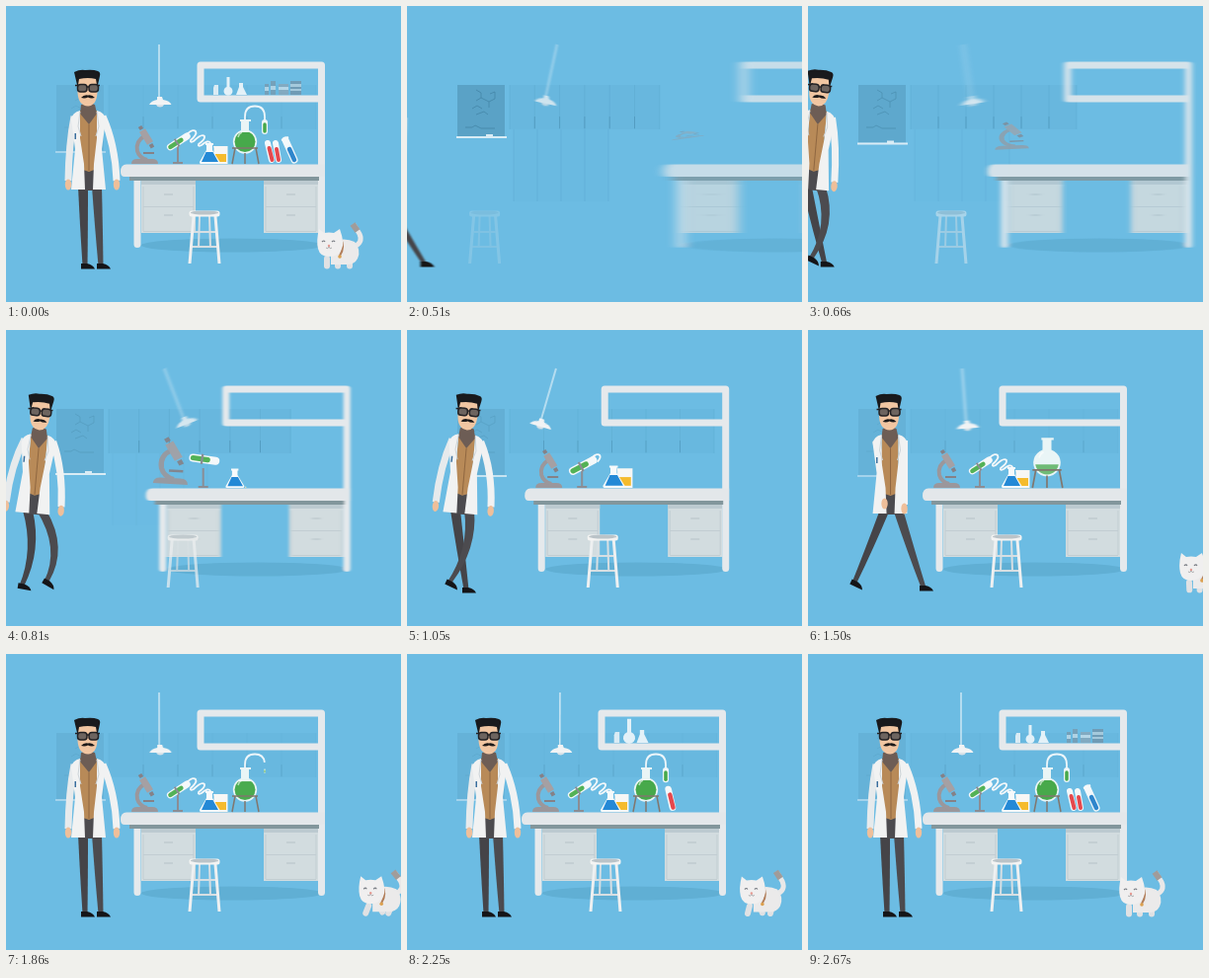
Write an HTML page that moves like this. It is 400 px wide and 300 px high and loops after 2.88 s.

```html
<!DOCTYPE html>
<html lang="en">
<head>
<meta charset="utf-8">
<title>Laboratory</title>
<style>
html, body { margin: 0; width: 100%; height: 100%; overflow: hidden; background: #6cbce3; }
svg { display: block; width: 100%; height: 100%; }
.line { fill: none; stroke-linejoin: round; }
.round { stroke-linecap: round; }
</style>
</head>
<body>
<svg viewBox="0 0 400 300">
<defs>
  <filter id="deskBlur" filterUnits="userSpaceOnUse" x="-500" y="0" width="1400" height="300"><feGaussianBlur stdDeviation="0 0"/></filter>
  <filter id="manBlur" filterUnits="userSpaceOnUse" x="-100" y="0" width="400" height="300"><feGaussianBlur stdDeviation="0 0"/></filter>
  <filter id="lampBlur" filterUnits="userSpaceOnUse" x="0" y="0" width="400" height="200"><feGaussianBlur stdDeviation="0 0"/></filter>
  <clipPath id="bulb"><circle cx="242" cy="137.500" r="10.500"/></clipPath>
  <g id="drawers">
    <path fill="#d2dcdf" d="M0 176h55v54H0z"/>
    <path fill="#bccad0" d="M0 176h55v5H0z"/>
    <path class="line" stroke="#c1cdd2" d="M2 203.500h51M2 228.500h51M2 183v45M53 183v45"/>
    <path class="line" stroke="#b5c2c8" stroke-width="1.200" d="M23 191h9M23 212h9"/>
  </g>
</defs>
<rect width="400" height="300" fill="#6cbce3"/>
<g id="scene">
  <g id="cabinets"></g>
  <g id="board">
    <rect id="slate" x="51" y="80" width="48" fill="#5399bb" opacity=".75"/>
    <path class="line" stroke="#3f7f9f" stroke-width=".7" d="M70 85l5 3v5l-5 3M75 93l8 4 6-3v-7l-5 2M66 104l5-3 5 3M83 97v6M59 123h7l3-2 6 3h14M70 110l8-3 4 3"/>
  </g>
  <path id="tray" fill="#d9ecf5" d="M50 0h51v2H50zM80-2h7v2h-7z"/>

  <g id="lamp">
    <path class="line" stroke="#dceef7" stroke-width="1.300" d="M155 39V93"/>
    <path fill="#f1f3f4" d="M153 92h5l1 3q7 1 8.500 5H145q2-4 8-5z"/>
    <path fill="#d8e2e8" d="M152 100h8q-1 2.500-4 2.500t-4-2.500z"/>
  </g>

  <g id="desk">
    <ellipse cx="229" cy="242.500" rx="92" ry="7" fill="#60afd4"/>
    <use href="#drawers" x="137"/>
    <use href="#drawers" x="261"/>
    <path class="line round" stroke="#e5e9ec" stroke-width="7" d="M133 175V241.500M319.500 241.500V60H197V94H319"/>
    <path fill="#82969c" d="M125 172H317v5H125z"/>
    <path fill="#e3e7ea" d="M122 160.500H323v12.500H120q-4 0-4-5 0-7.500 6-7.500z"/>
  </g>

  <g id="gear">
    <g id="shelf">
      <g class="pop" data-at="1950" data-x="213" data-y="90"><path fill="#d9ebf4" d="M211 80h4v10h-5v-7z"/></g>
      <g class="pop" data-at="1980" data-x="225" data-y="90" data-over="1.350"><path fill="#e3f1f8" d="M223.500 72h3v10a4.500 4.500 0 1 1-3 0z"/></g>
      <g class="pop" data-at="2000" data-x="238" data-y="90"><path fill="#e3f1f8" d="M236 78h4v4l4 8h-11l3-8z"/></g>
      <g opacity=".75">
        <g class="pop" data-at="2280" data-x="268" data-y="90" data-pace=".8"><path fill="#7898ad" d="M262 79h4v11h-4zM268 76h5v14h-5z"/><path fill="#c7dbe6" d="M262 82h4v4h-4zM268 81h5v4h-5z"/></g>
        <g class="pop" data-at="2300" data-x="281" data-y="90" data-pace=".8"><path fill="#8ba6b7" d="M276 79h10v11h-10z"/><path fill="#cfe0ea" d="M276 82h10v3h-10z"/></g>
        <g class="pop" data-at="2310" data-x="294" data-y="90" data-pace=".8"><path fill="#7292a7" d="M288 76h11v14h-11z"/><path fill="#b8cfdc" d="M288 79h11v3h-11zM288 84h11v2h-11z"/></g>
      </g>
    </g>

    <g id="scope">
      <path fill="#9b979b" d="M127 160q0-5 6-5h15q6 0 6 5z"/>
      <path class="line" stroke="#9b979b" stroke-width="4" d="M140 132q-9 5-7 15 2 7 10 9"/>
      <path class="line" stroke="#858187" stroke-width="2" d="M139 149h11"/>
      <path class="line" stroke="#a5a0a3" stroke-width="7" d="M138 126l8 13"/>
      <path class="line" stroke="#858187" stroke-width="4" d="M135.500 122l2 3M146.500 140l2 3.500"/>
    </g>

    <g id="stand">
      <path class="line" stroke="#8b8d94" stroke-width="2" d="M174 140V159M169 159h10"/>
      <g id="tube">
        <path class="line round" stroke="#f4f8fa" stroke-width="7" d="M-9 0H11"/>
        <path class="line round" stroke="#53b256" stroke-width="4.500" d="M-9 0H4"/>
        <path class="line" stroke="#8b8d94" stroke-width="2" d="M-1-4.500V4.500"/>
      </g>
    </g>
    <path id="coil" class="line" stroke="#f4f8fa" stroke-width="1.800" pathLength="1" stroke-dasharray="1 2" d="M182 131q7-7 10-4 2 3-5 9-1 3 3 1 8-8 11-5 1 3-6 8-1 3 3 1 7-6 9-2 1 3-1 5"/>

    <g class="pop" data-at="800" data-x="217" data-y="160">
      <path fill="#f7f7f5" d="M210 142h14.500v18h-14v-16z"/><path fill="#f5bb2d" d="M212 150h11v8h-11z"/>
    </g>
    <g class="pop" data-at="660" data-x="206" data-y="160" data-over="1.220">
      <path fill="#f7fafb" d="M202 139h8v2h-1v5l7.500 12q0 2-2 2h-17q-2 0-1.500-2l7-12v-5h-1z"/>
      <path fill="#2489d6" d="M202.500 148h7l5.500 10h-17z"/>
    </g>

    <g class="pop" data-at="1230" data-x="242" data-y="160">
      <path fill="#e9f5f6" d="M237 115h11v2h-2v9a12.200 12.200 0 1 1-8 0v-9h-1z"/>
      <g clip-path="url(#bulb)"><rect id="liquid" x="228" width="28" height="40" fill="#47a94b"/></g>
      <path class="line" stroke="#fff" stroke-width="1.500" opacity=".6" d="M235 133q1-4 4-5"/>
      <path class="line" stroke="#81776f" stroke-width="1.500" d="M229 144h26M232 144l-3 16M253 144l3 16M242 149v11"/>
    </g>
    <path id="pipe" class="line" stroke="#edf6fa" stroke-width="1.800" pathLength="1" stroke-dasharray="1 2" d="M242 117V112Q242 101.500 252 101.500T262 112V118"/>
    <g class="pop" data-at="1820" data-x="262" data-y="117">
      <path class="line round" stroke="#f0f7f9" stroke-width="6" d="M262 118v9"/>
      <path class="line round" stroke="#47a94b" stroke-width="3.500" d="M262 120v7"/>
    </g>
    <g class="pop" data-at="2000" data-x="269" data-y="160">
      <path class="line round" stroke="#f4f8fa" stroke-width="6" d="M265 139l4 17"/><path class="line round" stroke="#e5484d" stroke-width="4" d="M266.500 144l3 12"/>
    </g>
    <g class="pop" data-at="2260" data-x="275" data-y="160" data-pace=".85">
      <path class="line round" stroke="#f4f8fa" stroke-width="6" d="M273 139l3 17"/><path class="line round" stroke="#e5484d" stroke-width="4" d="M274 145l2 11"/>
    </g>
    <g class="pop" data-at="2290" data-x="291" data-y="160" data-pace=".8">
      <path class="line round" stroke="#f4f8fa" stroke-width="7" d="M283 136l9 20"/><path class="line round" stroke="#2f86cc" stroke-width="4.500" d="M287 145l5 11"/>
      <path class="line" stroke="#f4f8fa" stroke-width="2" d="M279 136l7-3"/>
    </g>
  </g>

  <g id="stool">
    <path class="line" stroke="#d7dfe3" stroke-width="2" d="M196 213l-1 32M206 213l1 32M190 229h22M188 244h26"/>
    <path class="line" stroke="#eef0f1" stroke-width="3" d="M190 213l-4 48M212 213l4 48"/>
    <rect x="185.500" y="207.500" width="31" height="6" rx="2.500" fill="#f4f4f3"/>
    <ellipse cx="201" cy="209.500" rx="14" ry="2" fill="#bac3c8"/>
  </g>

  <g id="man">
    <path id="legA" fill="#454448"/>
    <path id="legB" fill="#4c4b4f"/>
    <path id="shoeA" fill="#151518" d="M-4-3h6q6 1 8 5.500H-4z"/>
    <path id="shoeB" fill="#151518" d="M-4-3h6q6 1 8 5.500H-4z"/>
    <g id="body">
      <path id="armL" class="line" stroke="#e6eaec" stroke-width="7"/>
      <path fill="#4c4b4f" d="M75 164h18v23H75z"/>
      <path fill="#b88a58" d="M75 106h17v59l-8 3-9-3z"/>
      <path class="line" stroke="#8f6740" d="M84 120v47"/>
      <path fill="#6d5d55" d="M76 100q8-3 14 0l2 9-8 11-9-11z"/>
      <path fill="#f1f2f2" d="M75 106q-8 2-9 9l4 30-4 41h14l-1-26-4-26z"/>
      <path fill="#f1f2f2" d="M92 106q8 2 9 9l-4 30 4 41H88l1-26 3-26z"/>
      <path class="line" stroke="#cdd5da" d="M75 107l-2 15 3 10M92 107l2 15-3 10"/>
      <path fill="#3a6f9d" d="M69.500 129h1.500v6h-1.500z"/>
      <path id="armR" class="line" stroke="#f1f2f2" stroke-width="7"/>
      <ellipse id="handL" rx="3.200" ry="5.500" fill="#efbf9a"/>
      <ellipse id="handR" rx="3.200" ry="5.500" fill="#efbf9a"/>
      <path fill="#f1c6a2" d="M73 72h19l.500 16q-1 13-9.500 13.500Q73.500 101 72.500 88z"/>
      <path fill="#191a1d" d="M69 67q6-3 11-2 8-1 13 1 3 1 2 5l-2 9h-1l-1-6q-8-2-17 0l-1 6h-1z"/>
      <g fill="#6d645f" stroke="#232225" stroke-width="1.500"><rect x="72.500" y="79.500" width="9.500" height="7.500" rx="3"/><rect x="84" y="79.500" width="9.500" height="7.500" rx="3"/></g>
      <path class="line" stroke="#232225" stroke-width="1.500" d="M70 80.500h3M82 82h2M93 80.500h2"/>
      <path fill="#1d1a1a" d="M83 90.500q4-1 7 2.500-4 1-7-.500-3 1.500-7 .500 3-3.500 7-2.500z"/>
    </g>
  </g>

  <g id="cat">
    <g id="tail">
      <path class="line round" stroke="#e9e8e8" stroke-width="5" d="M352 244q10-4 6-13l-5-8"/>
      <path class="line" stroke="#a09c9a" stroke-width="6" d="M356 228l-5-7"/>
    </g>
    <g id="paws" class="line round" stroke="#e0e1e3" stroke-width="6"><path/><path/><path/></g>
    <path fill="#ebeaea" d="M329 239q14-5 24 0 7 8 3 17-3 6-11 6h-16z"/>
    <path class="line" stroke="#b17d59" stroke-width="2" d="M338 234q6 10 0 19"/>
    <path fill="#f0efef" d="M317 226l5 4q5-1 10 0l6-4q5 14 2 20-4 8-13 8t-11-8q-2-8 1-20z"/>
    <path class="line" stroke="#777b82" stroke-width="1.200" d="M320 239q2-2 3 0M330 239q2-2 3 0"/>
    <path class="line" stroke="#9a9c9f" stroke-width=".8" d="M324 245q2 2 3-1 1 3 3 1"/>
    <circle cx="327" cy="243" r="1.200" fill="#e59a92"/>
    <circle cx="338" cy="254" r="1.800" fill="#dba04f"/>
  </g>
</g>
</svg>
<script>
const LOOP = 2880, STEP = 30, END = 2670;
const $ = id => document.getElementById(id);
const set = (el, attrs) => { for (const k in attrs) el.setAttribute(k, attrs[k]); };
const clamp = (v, lo = 0, hi = 1) => Math.min(hi, Math.max(lo, v));
const ramp = (t, a, b) => clamp((t - a) / (b - a));

// Linear track through [time, value] points
function track(t, points) {
  if (t <= points[0][0]) return points[0][1];
  for (let i = 1; i < points.length; i++) {
    const [t0, a] = points[i - 1], [t1, b] = points[i];
    if (t <= t1) return a + (b - a) * (t - t0) / (t1 - t0);
  }
  return points[points.length - 1][1];
}

const deskShift = t => 144 * Math.pow(Math.max(0, 1470 - t) / 960, 4.6);
const manShift = t => -100 * Math.pow(Math.max(0, 1600 - t) / 1090, 2.25);
const speed = (fn, t) => Math.abs(fn(t + 1) - fn(t - 1)) / 2;

function blur(el, id, amount) {
  if (amount < 0.4) return el.removeAttribute("filter");
  $(id).firstElementChild.setAttribute("stdDeviation", amount.toFixed(2) + " 0");
  el.setAttribute("filter", `url(#${id})`);
}

function drawBack(t) {
  const cell = track(t, [[180, 20], [510, 25.3], [810, 30.7], [1050, 34.5], [1300, 35]]);
  const left = 104, width = cell * 6;
  let d = "", handles = "", low = "";
  for (let i = 0; i <= 6; i++) {
    const x = left + i * cell;
    d += `M${x} 80V125`;
    if (i > 0 && i < 6) handles += `M${x} 112V124`;
    if (i < 5) low += `M${108 + i * 24} 125V198`;
  }
  $("cabinets").innerHTML =
    `<rect x="${left}" y="80" width="${width}" height="45" fill="#3b7fa6" opacity=".08"/>` +
    `<path class="line" stroke="#4a8fb3" opacity=".18" d="${d}"/>` +
    `<path class="line" stroke="#39789b" opacity=".35" d="${handles}"/>` +
    `<g opacity="${1 - ramp(t, 510, 1000)}"><rect x="108" y="125" width="96" height="73" fill="#3b7fa6" opacity=".04"/>` +
    `<path class="line" stroke="#4a8fb3" opacity=".2" d="${low}"/></g>`;
  set($("cabinets"), { opacity: ramp(t, 210, 480) * track(t, [[810, 1], [1500, .7]]) });

  const bottom = track(t, [[180, 100], [510, 132], [810, 145], [1050, 147]]);
  const shown = ramp(t, 180, 450);
  set($("slate"), { height: bottom - 80 });
  set($("board"), { opacity: shown * track(t, [[510, .95], [810, .55], [1500, .35]]) });
  set($("tray"), { transform: `translate(0 ${bottom})`, opacity: shown * track(t, [[810, 1], [1500, .5]]) });
}

function swing(t) {
  const size = Math.min(23 * Math.exp((810 - t) / 800), track(t, [[180, 6], [510, 14], [810, 23]]));
  return size * Math.cos(Math.PI * (t - 1080) / 310) * clamp((2300 - t) / 800);
}

function drawLamp(t) {
  const a = swing(t);
  set($("lamp"), { transform: `translate(${-a * .25} 0) rotate(${a} 155 39)`, opacity: track(t, [[240, 0], [510, .75], [810, .8], [1000, 1]]) });
  blur($("lamp"), "lampBlur", speed(swing, t) * 18);
}

function drawDesk(t) {
  const x = deskShift(t), move = `translate(${x} 0)`;
  set($("desk"), { transform: move, opacity: track(t, [[180, .3], [510, .75], [810, 1]]) });
  blur($("desk"), "deskBlur", Math.min(12, speed(deskShift, t) * 7.5));
  set($("gear"), { transform: move });
  set($("stool"), { transform: `translate(${-.85 * x} 0)`, opacity: track(t, [[400, 0], [510, .18], [810, .7], [1000, 1]]) });
}

function drawGear(t) {
  for (const el of document.querySelectorAll(".pop")) {
    const { at, x, y, pace = 1, over = 1.13 } = el.dataset;
    const s = track((t - at) / pace, [[0, 0], [120, .85], [270, +over], [450, 1]]);
    set(el, { transform: `translate(${x} ${y}) scale(${s}) translate(${-x} ${-y})` });
  }
  const sx = track(t, [[510, 1.25], [810, 1.3], [1050, 1]]);
  const sy = track(t, [[510, .2], [810, 1.22], [1050, 1]]);
  const up = track(t, [[510, -26], [810, -4], [1050, 0]]);
  const tilt = track(t, [[510, -8], [810, 3], [1050, 0]]);
  set($("scope"), { transform: `translate(140 ${160 + up}) rotate(${tilt}) scale(${sx} ${sy}) translate(-140 -160)`, opacity: track(t, [[400, 0], [510, .4], [810, .9], [900, 1]]) });

  const turn = track(t, [[700, 40], [810, 8], [1050, -28], [1250, -36], [1400, -33]]);
  const big = track(t, [[690, .5], [810, 1.15], [1050, 1.15], [1250, 1]]);
  const lift = track(t, [[810, -7], [1050, 0]]);
  set($("tube"), { transform: `translate(174 ${138 + lift}) rotate(${turn}) scale(${big})` });
  set($("stand"), { opacity: ramp(t, 660, 790) });
  set($("coil"), { "stroke-dashoffset": 1 - ramp(t, 950, 1320), opacity: t > 950 ? 1 : 0 });
  set($("liquid"), { y: track(t, [[1320, 149], [1500, 139], [1900, 128]]), opacity: track(t, [[1320, .4], [1500, .75], [1900, 1]]) });
  set($("pipe"), { "stroke-dashoffset": 1 - ramp(t, 1680, 1900), opacity: t > 1680 ? 1 : 0 });
}

// Tapered leg from hip to ankle, the knee bending forward when the foot comes close
function leg(name, hip, x, y) {
  const half = Math.hypot(x - hip, y - 186) / 2;
  const bend = Math.sqrt(Math.max(0, 38.5 * 38.5 - half * half));
  const kx = (hip + x) / 2 + bend * 1.3, ky = (186 + y) / 2;
  set($("leg" + name), { d: `M${hip - 5} 183Q${kx - 4} ${ky} ${x - 2.5} ${y - 1}h5Q${kx + 4} ${ky} ${hip + 5} 183z` });
  set($("shoe" + name), { transform: `translate(${x} ${y}) rotate(${clamp((262 - y) * 5, 0, 30)})` });
}

function arm(side, shoulder, x, y) {
  set($("arm" + side), { d: `M${shoulder} 112Q${shoulder + (x - shoulder) * .9} 140 ${x} ${y - 4}` });
  set($("hand" + side), { cx: x, cy: y });
}

function drawMan(t) {
  const off = manShift(t);
  const lean = track(t, [[1050, 5], [1500, 0]]);
  set($("man"), { transform: `translate(${off} 0)` });
  set($("body"), { transform: `rotate(${lean} 83 92)` });
  blur($("man"), "manBlur", speed(manShift, t) * 4);
  leg("A", 78 - lean * 1.5,
    track(t, [[180, -90], [420, 18], [810, 16], [1050, 60], [1350, 52], [1500, 47], [1770, 80]]) - off,
    track(t, [[700, 262], [810, 260], [930, 256], [1050, 264], [1400, 262], [1500, 257], [1640, 258], [1770, 264]]));
  leg("B", 92 - lean * 1.5,
    track(t, [[510, -35], [810, 41], [1050, 43], [1300, 95], [1500, 117], [1770, 96]]) - off,
    track(t, [[510, 258], [810, 256], [900, 262], [1050, 257], [1300, 257], [1500, 262], [1770, 264]]));
  arm("L", 69, track(t, [[510, 70], [810, 56], [1050, 58], [1500, 78], [1800, 63]]), track(t, [[1050, 181], [1500, 176], [1800, 181]]));
  arm("R", 98, track(t, [[510, 100], [810, 112], [1050, 114], [1500, 98], [1800, 112]]), 181);
}

function drawCat(t) {
  const x = (END - t) * .0521, phase = (END - t) / 75;
  set($("cat"), { transform: `translate(${x} ${-Math.abs(Math.sin(phase)) * .8})`, opacity: t < 1080 ? 0 : 1 });
  [325, 336, 348].forEach((px, i) => {
    const s = Math.sin(phase + i * Math.PI) * 3;
    set($("paws").children[i], { d: `M${px} 256L${px + s} ${263.5 - Math.max(0, s) * .4}` });
  });
  set($("tail"), { transform: `rotate(${Math.sin(phase / 2) * 4} 354 243)` });
}

function frame(now) {
  const clock = Math.floor((now % LOOP) / STEP) * STEP;
  const t = clock < 30 ? END : Math.min(clock, END);
  $("scene").style.visibility = t < 180 ? "hidden" : "visible";
  [drawBack, drawLamp, drawDesk, drawGear, drawMan, drawCat].forEach(draw => draw(t));
}

const start = performance.now();
function tick() {
  frame(performance.now() - start);
  requestAnimationFrame(tick);
}
tick();
</script>
</body>
</html>
```
